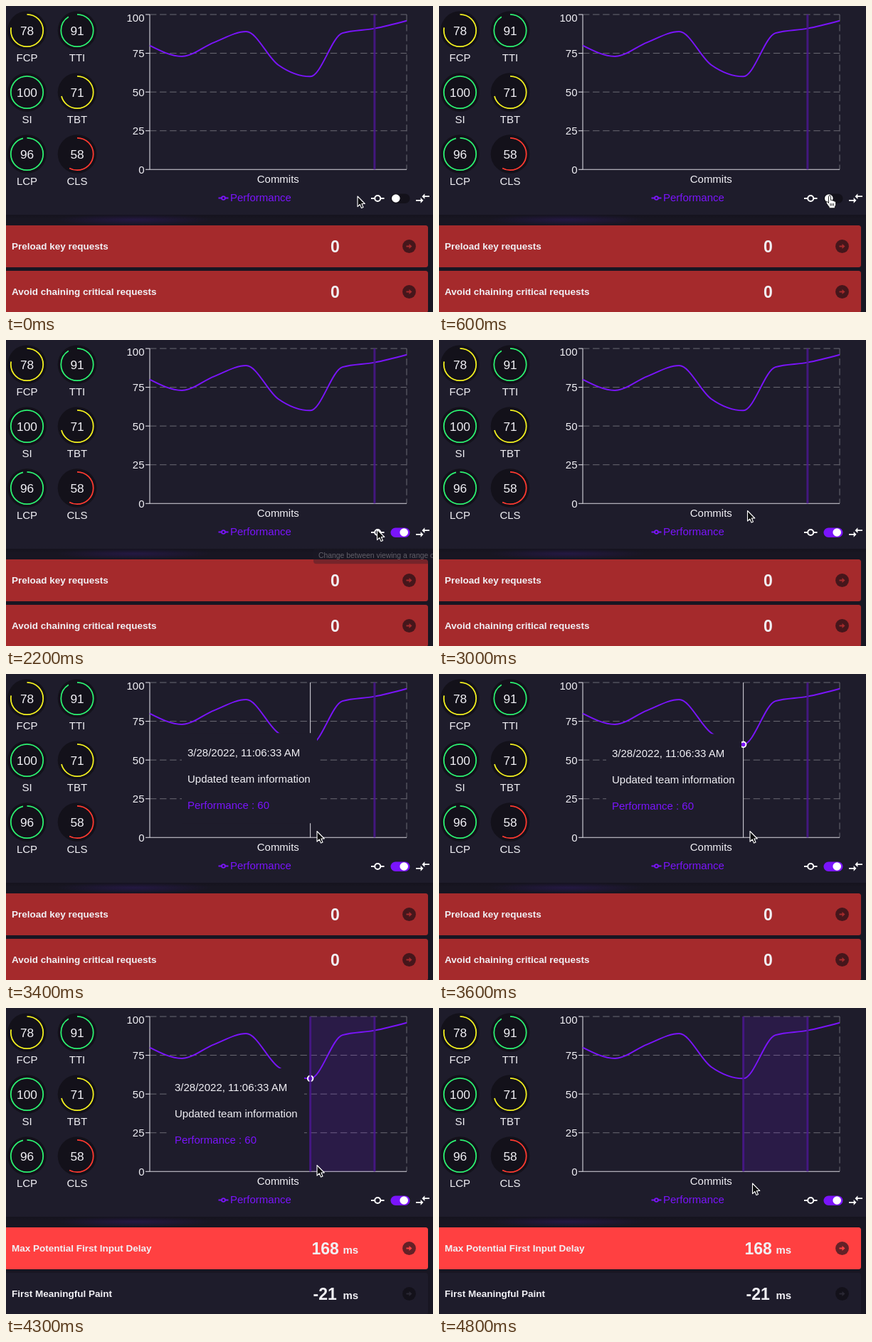
Animation, 600 px wide and 431 px high, one loop 4900 ms. Source, as an HTML page:

```html
<!DOCTYPE html>
<html lang="en">
<head>
<meta charset="utf-8">
<title>Performance dashboard</title>
<style>
html, body { margin: 0; width: 100%; height: 100%; overflow: hidden; background: #181622; }
svg { display: block; width: 100%; height: 100%; font-family: "Liberation Sans", Arial, sans-serif; }
</style>
</head>
<body>
<svg id="stage" viewBox="0 0 600 431">
  <defs>
    <radialGradient id="glow"><stop offset="0" stop-color="#2c1a58" stop-opacity=".6"/><stop offset="1" stop-color="#2c1a58" stop-opacity="0"/></radialGradient>
    <linearGradient id="shade" x2="0" y2="1"><stop offset="0" stop-color="#12101a" stop-opacity=".5"/><stop offset="1" stop-color="#12101a" stop-opacity="0"/></linearGradient>
  </defs>
  <rect width="600" height="431" fill="#181622"/>
  <ellipse cx="180" cy="301" rx="110" ry="8" fill="url(#glow)"/>
  <rect y="294" width="600" height="6" fill="url(#shade)"/>
  <rect width="600" height="294" fill="#1e1c2b"/>
  <g id="gauges"></g>
  <g id="chart"></g>
  <g id="icons" fill="#fff">
    <path d="M513 271H518M526.5 271H531.5" stroke="#fff" stroke-width="2"/>
    <circle cx="522.2" cy="271" r="4" fill="none" stroke="#fff" stroke-width="2"/>
    <path transform="translate(574.1 259.6) scale(.95)" d="M9 14H2v2h7v3l4-4-4-4zM15 13v-3h7V8h-7V5l-4 4z"/>
    <rect id="track" x="540.5" y="264.5" width="27" height="13.5" rx="6.75"/>
    <circle id="thumb" cy="271" r="5.8"/>
  </g>
  <g id="before"></g>
  <g id="after"></g>
  <g id="hint">
    <rect x="421" y="292" width="264" height="22.5" rx="4" fill="#1c1a27"/>
    <text x="428" y="306.5" font-size="10.4" fill="#f0eff4">Change between viewing a range or single commit</text>
  </g>
  <path id="arrow" d="M0 0V14.6L3.3 11.5 5.5 16.6 8 15.5 5.9 10.5H10.3Z" fill="#0b0b0e" stroke="#fff" stroke-width="1.1" stroke-linejoin="round"/>
  <g id="hand" stroke="#111" stroke-width=".9" stroke-linejoin="round">
    <path fill="#fff" d="M-1.5 10V1Q-1.5-.6 0-.6T1.5 1V6Q3.6 5.2 4 6.7 6 6 6.4 7.6 8.6 7.2 8.6 9.3V12Q8.4 14 7.3 15.3V17.3H-.8V15.5Q-3 13-4.6 10.3-5.6 8.2-4 8-2.6 8-1.5 10Z"/>
    <path fill="none" d="M1 10.5V14M3.2 10.5V14M5.4 10.5V14"/>
  </g>
</svg>
<script>
const $ = id => document.getElementById(id);
const LOOP = 4900, PICK = 3700;
const PURPLE = '#7a14fb', INK = '#f1f0f5';
const GREEN = '#2cf171', YELLOW = '#f2f01f', RED = '#ff3a30';

const text = (s, x, y, size, extra = '') =>
  `<text x="${x}" y="${y + size * 0.36}" font-size="${size}" fill="${INK}" ${extra}>${s}</text>`;
const MID = 'text-anchor="middle"';
const line = (x1, y1, x2, y2, attrs) => `<path d="M${x1} ${y1}L${x2} ${y2}" fill="none" ${attrs}/>`;

// Score rings
function gauge([name, score, color], i) {
  const x = 29.5 + (i % 2) * 70.5, y = 34.5 + Math.floor(i / 2) * 87;
  return `<circle cx="${x}" cy="${y}" r="27.3" fill="#13111a"/>
    <circle cx="${x}" cy="${y}" r="22.7" fill="none" stroke="${color}" stroke-width="1.8" pathLength="100"
      stroke-dasharray="${score} 100" transform="rotate(-90 ${x} ${y})"/>` +
    text(score, x, y, 17.3, MID) + text(name, x, y + 38.5, 15, MID);
}
$('gauges').innerHTML = [
  ['FCP', 78, YELLOW], ['TTI', 91, GREEN], ['SI', 100, GREEN],
  ['TBT', 71, YELLOW], ['LCP', 96, GREEN], ['CLS', 58, RED]
].map(gauge).join('');

// Chart
const LEFT = 202, RIGHT = 563, TOP = 12, BASE = 230.3;
const scores = [80, 73, 82, 89, 67.5, 60, 88, 91, 96];
const step = (RIGHT - LEFT) / (scores.length - 1);
const px = i => LEFT + i * step;
const py = v => BASE - v * (BASE - TOP) / 100;

// Monotone cubic through the scores
function curve() {
  const y = scores.map(py), n = y.length;
  const d = i => (y[i + 1] - y[i]) / step;
  const m = y.map((_, i) => {
    if (i === 0 || i === n - 1) return 0;
    const a = d(i - 1), b = d(i);
    return a * b <= 0 ? 0 : Math.sign(a) * Math.min(2 * Math.abs(a), 2 * Math.abs(b), Math.abs(a + b) / 2);
  });
  m[0] = (3 * d(0) - m[1]) / 2;
  m[n - 1] = (3 * d(n - 2) - m[n - 2]) / 2;
  const h = step / 3;
  let p = `M${px(0)} ${y[0]}`;
  for (let i = 1; i < n; i++)
    p += `C${px(i - 1) + h} ${y[i - 1] + m[i - 1] * h} ${px(i) - h} ${y[i] - m[i] * h} ${px(i)} ${y[i]}`;
  return p;
}

const dash = 'stroke="#6b6a74" stroke-width="1" stroke-dasharray="9.4 4.7"';
const axis = 'stroke="#d9d8e0" stroke-width="1.1"';
const mark = 'stroke="#4a178f" stroke-width="3"';
const ticks = [0, 25, 50, 75, 100];
const pickX = px(5), lastX = px(7);
$('chart').innerHTML =
  ticks.slice(1).map(v => line(LEFT, py(v), RIGHT, py(v), dash)).join('') +
  line(RIGHT, TOP, RIGHT, BASE, dash) +
  line(LEFT, TOP, LEFT, BASE, axis) + line(LEFT, BASE, RIGHT, BASE, axis) +
  ticks.map(v => line(LEFT - 6, py(v), LEFT, py(v), axis) +
    text(v, 194.5, v === 100 ? 16.5 : py(v), 15, 'text-anchor="end"')).join('') +
  text('Commits', 382.3, 244, 15, MID) +
  `<rect id="range" x="${pickX}" y="${TOP}" width="${lastX - pickX}" height="${BASE - TOP}" fill="#6a16d8" opacity=".16"/>` +
  `<path d="${curve()}" fill="none" stroke="${PURPLE}" stroke-width="1.9"/>` +
  line(pickX, TOP, pickX, BASE, `id="guide" stroke="#dddce4" stroke-width="1"`) +
  `<circle id="dot" cx="${pickX}" cy="${py(60)}" r="3.8" fill="${PURPLE}" stroke="#fff" stroke-width="1.9"/>` +
  line(lastX, TOP, lastX, BASE, mark + ' opacity=".85"') +
  line(pickX, TOP, pickX, BASE, mark + ' id="pick" opacity=".85"') +
  `<g id="tip"><rect x="229" y="85" width="190" height="127" fill="#1e1c2b"/>` +
  text('3/28/2022, 11:06:33 AM', 237, 112, 15) +
  text('Updated team information', 237, 149, 15) +
  text('Performance : 60', 237, 186, 15, `style="fill:${PURPLE}"`) + '</g>' +
  `<path d="M298.5 270.5H303M308 270.5H312.5" stroke="${PURPLE}" stroke-width="1.9"/>
   <circle cx="305.5" cy="270.5" r="2.4" fill="none" stroke="${PURPLE}" stroke-width="1.8"/>` +
  text('Performance', 315, 269.8, 15, `style="fill:${PURPLE}"`);

// Audit rows
function row(y, title, value, unit, x, fill, disc, tint) {
  const c = y + 29.5, bold = 'font-weight="700"';
  return `<rect x="-6" y="${y}" width="599" height="59" rx="3.5" fill="${fill}"/>` +
    text(title, 8, c - 0.5, 13.5, bold) + text(value, x, c, 23, bold) +
    text(unit, 473.5, c + 2.5, 15, bold) +
    `<circle cx="566.5" cy="${c}" r="9.4" fill="${disc}"/>
     <path d="M562.5 ${c - 0.9}h4v-2.6l4 3.5-4 3.5v-2.6h-4z" fill="${tint}"/>`;
}
const dull = ['#a52a2c', '#45161b', '#a52a2c'];
$('before').innerHTML =
  row(309, 'Preload key requests', '0', '', 456, ...dull) +
  row(373, 'Avoid chaining critical requests', '0', '', 456, ...dull);
$('after').innerHTML =
  row(309, 'Max Potential First Input Delay', '168', 'ms', 429.5, '#ff4041', '#642127', '#ff4041') +
  row(373, 'First Meaningful Paint', '-21', 'ms', 431.5, '#1e1c2b', '#13111a', '#2a2834');

// Pointer stops: time, x, y
const path = [
  [0, 494, 268], [100, 494, 268], [600, 549, 267.5], [1800, 549, 267.5], [2200, 521.5, 267],
  [3000, 433.5, 240.5], [3300, 437, 221.5], [4300, 437, 221.5], [4800, 440.5, 247]
];
const clamp = v => Math.max(0, Math.min(1, v));
const ramp = (t, a, b) => clamp((t - a) / (b - a));
const show = (id, on) => $(id).setAttribute('visibility', on ? 'visible' : 'hidden');
const move = (id, x, y) => $(id).setAttribute('transform', `translate(${x} ${y})`);

function pointer(t) {
  const i = Math.max(1, path.findIndex(p => p[0] >= t));
  const [a, b] = [path[i - 1], path[i]], k = ramp(t, a[0], b[0]);
  return [a[1] + (b[1] - a[1]) * k, a[2] + (b[2] - a[2]) * k];
}

function mix(a, b, k) {
  return `rgb(${a.map((v, i) => Math.round(v + (b[i] - v) * k))})`;
}

function draw(t) {
  const [x, y] = pointer(t);
  const onSwitch = x > 541 && x < 567;
  show('hand', onSwitch);
  show('arrow', !onSwitch);
  move('hand', x, y);
  move('arrow', x, y);

  const on = ramp(t, 1400, 1600);
  $('track').setAttribute('fill', mix([19, 17, 26], [122, 20, 251], on));
  $('thumb').setAttribute('cx', 547.8 + 11.4 * on);

  const out = ramp(t, 2000, 2300);
  $('hint').setAttribute('opacity', ramp(t, 600, 900) * (1 - out));
  move('hint', 16.5 * out, out);

  const hover = t > 3000 && y < 230, picked = t >= PICK;
  const slide = 1 - ramp(t, 3200, PICK);
  show('tip', hover);
  show('dot', hover);
  show('guide', hover && !picked);
  move('tip', 30 * slide, -3 * slide);
  for (const id of ['range', 'pick', 'after']) show(id, picked);
  show('before', !picked);
}

function tick() {
  draw(Math.floor(performance.now() % LOOP / 100) * 100);
  requestAnimationFrame(tick);
}
tick();
</script>
</body>
</html>
```
